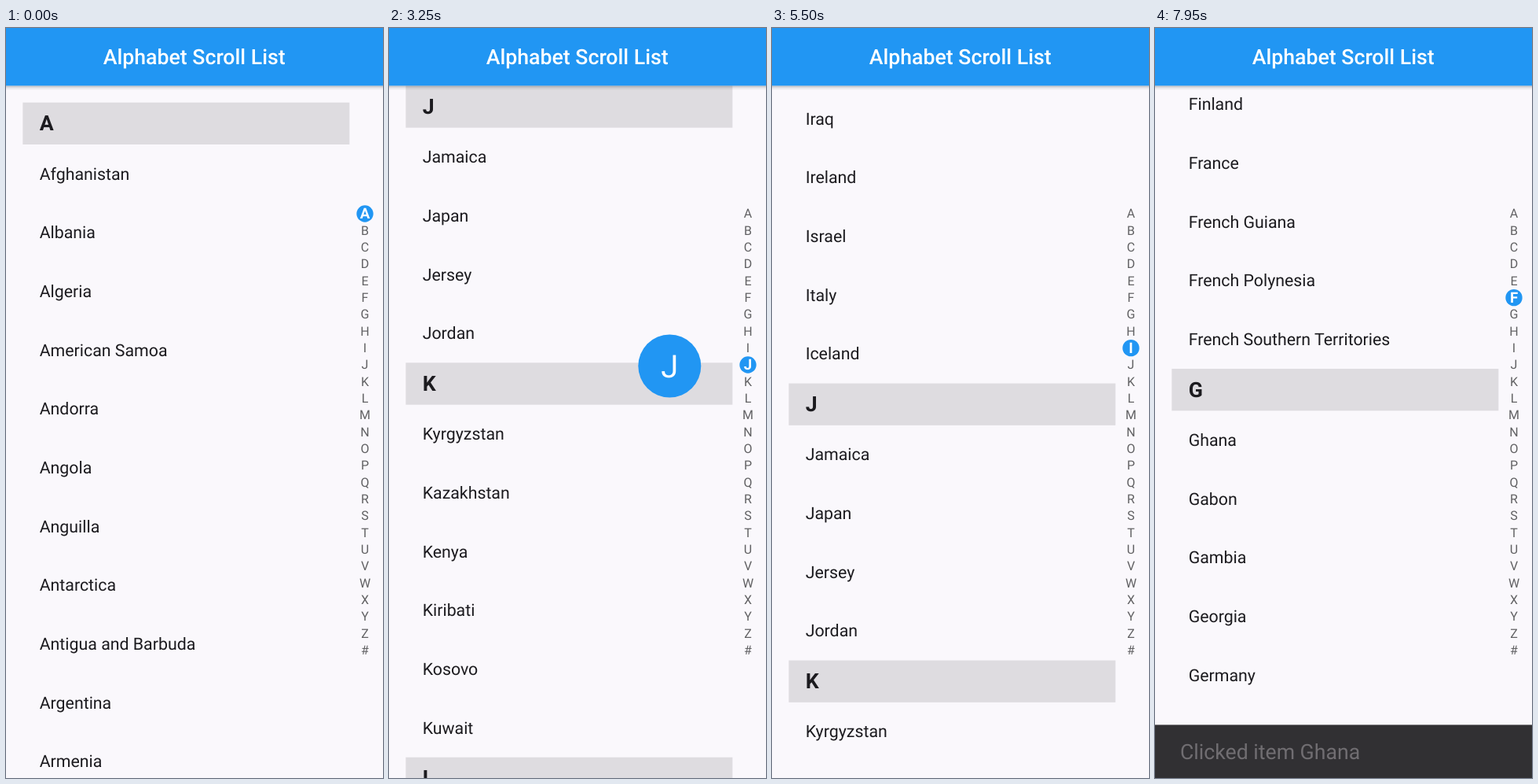
An HTML page for the animation above (8 s loop, 480x953 px).

```html
<!DOCTYPE html>
<html lang="en">
<head>
<meta charset="utf-8">
<title>Alphabet Scroll List</title>
<style>
  html, body { margin: 0; width: 100%; height: 100%; overflow: hidden; background: #faf8fc; }
  svg { display: block; width: 100%; height: 100%; }
  text { font-family: Roboto, "Open Sans", sans-serif; text-rendering: geometricPrecision; white-space: pre; }
</style>
</head>
<body>
<svg id="stage" viewBox="0 0 480 953"></svg>
<script>
const LOOP = 8000, STEP = 50;
const DP = 4 / 3;
const BAR = 55 * DP, HEAD = 40 * DP, ROW = 56 * DP, PAD = 16 * DP;
const LIST_W = 416, INDEX_X = 457, INDEX_Y = 236, PITCH = 16 * DP;
const BLUE = '#2196f3', INK = '#1c1b1f';
const LETTERS = [...'ABCDEFGHIJKLMNOPQRSTUVWXYZ#'];

const COUNTRIES = {
  A: 'Afghanistan,Albania,Algeria,American Samoa,Andorra,Angola,Anguilla,Antarctica,Antigua and Barbuda,Argentina,Armenia,Aruba,Australia,Austria,Azerbaijan',
  B: 'Bahamas,Bahrain,Bangladesh,Barbados,Belarus,Belgium,Belize,Benin,Bermuda,Bhutan,Bolivia,Bosnia and Herzegovina,Botswana,Bouvet Island,Brazil,British Indian Ocean Territory,Brunei Darussalam,Bulgaria,Burkina Faso,Burundi',
  C: 'Cambodia,Cameroon,Canada,Cape Verde,Cayman Islands,Central African Republic,Chad,Chile,China,Christmas Island,Cocos (Keeling) Islands,Colombia,Comoros,Congo,Cook Islands,Costa Rica,Croatia,Cuba,Cyprus,Czech Republic',
  D: 'Denmark,Djibouti,Dominica,Dominican Republic',
  E: 'Ecuador,Egypt,El Salvador,Equatorial Guinea,Eritrea,Estonia,Ethiopia',
  F: 'Falkland Islands (Malvinas),Faroe Islands,Fiji,Finland,France,French Guiana,French Polynesia,French Southern Territories',
  G: 'Ghana,Gabon,Gambia,Georgia,Germany,Gibraltar,Greece,Greenland,Grenada,Guadeloupe,Guam,Guatemala,Guernsey,Guinea,Guinea-Bissau,Guyana',
  H: 'Haiti,Heard Island and Mcdonald Islands,Holy See (Vatican City State),Honduras,Hong Kong,Hungary',
  I: 'Isle of Man,India,Indonesia,Iran,Iraq,Ireland,Israel,Italy,Iceland',
  J: 'Jamaica,Japan,Jersey,Jordan',
  K: 'Kyrgyzstan,Kazakhstan,Kenya,Kiribati,Kosovo,Kuwait',
  L: 'Lesotho,Laos,Latvia,Lebanon,Liberia,Libyan Arab Jamahiriya,Liechtenstein,Lithuania,Luxembourg',
  M: 'Morocco'
};

const stage = document.getElementById('stage');

function add(parent, tag, attrs) {
  const el = document.createElementNS('http://www.w3.org/2000/svg', tag);
  set(el, attrs);
  return parent.appendChild(el);
}

function set(el, attrs) {
  for (const k in attrs) el.setAttribute(k, attrs[k]);
}

// Text whose line box is centred on cy
function label(parent, str, x, cy, size, attrs) {
  const el = add(parent, 'text', { x, y: cy + 0.3415 * size, 'font-size': size, ...attrs });
  el.textContent = str;
  return el;
}

function show(el, on) {
  el.setAttribute('visibility', on ? 'visible' : 'hidden');
}

const defs = add(stage, 'defs', {});
const shade = add(defs, 'linearGradient', { id: 'shade', x1: 0, y1: 0, x2: 0, y2: 1 });
add(shade, 'stop', { offset: 0, 'stop-color': '#000', 'stop-opacity': 0.26 });
add(shade, 'stop', { offset: 0.45, 'stop-color': '#000', 'stop-opacity': 0.08 });
add(shade, 'stop', { offset: 1, 'stop-color': '#000', 'stop-opacity': 0 });

add(stage, 'rect', { width: 480, height: 953, fill: '#faf8fc' });

// Scrolling list
const list = add(stage, 'g', {});
const tops = {}, rowTop = {};
let end = 0;
for (const [letter, names] of Object.entries(COUNTRIES)) {
  tops[letter] = end;
  add(list, 'rect', { x: PAD, y: end, width: LIST_W, height: HEAD, fill: '#dedce0' });
  label(list, letter, 2 * PAD, end + HEAD / 2, 20 * DP, { 'font-weight': 700, fill: INK });
  end += HEAD;
  for (const name of names.split(',')) {
    rowTop[name] = end;
    label(list, name, 2 * PAD, end + ROW / 2, 16 * DP, { fill: INK });
    end += ROW;
  }
}

// Touch ripple clipped to its row
function ripple(name, x, dy) {
  const y = rowTop[name], id = 'row' + name;
  const clip = add(defs, 'clipPath', { id });
  add(clip, 'rect', { x: PAD, y, width: LIST_W, height: ROW });
  const g = add(list, 'g', { 'clip-path': `url(#${id})` });
  return add(g, 'circle', { cx: x, cy: y + dy, r: 0, fill: '#000' });
}
const dragRipple = ripple('Latvia', 355, 0.5);
const tapRipple = ripple('Ghana', 221, 37);

// Letter index
const marker = add(stage, 'circle', { cx: INDEX_X, r: 8 * DP, fill: BLUE });
const indexY = i => INDEX_Y + i * PITCH;
const middle = { 'text-anchor': 'middle' };
const plain = LETTERS.map((c, i) =>
  label(stage, c, INDEX_X, indexY(i), 12 * DP, { ...middle, fill: '#616163' }));
const bold = LETTERS.map((c, i) =>
  label(stage, c, INDEX_X, indexY(i), 14 * DP, { ...middle, fill: '#fff', 'font-weight': 700 }));

// Balloon beside the finger
const balloon = add(stage, 'g', {});
add(balloon, 'circle', { r: 30 * DP, fill: BLUE });
const balloonText = label(balloon, '', 0, 0.6, 30 * DP, { ...middle, fill: '#fff' });

// App bar
add(stage, 'rect', { y: BAR, width: 480, height: 6, fill: 'url(#shade)' });
add(stage, 'rect', { width: 480, height: BAR, fill: BLUE });
label(stage, 'Alphabet Scroll List', 239.7, BAR / 2, 20 * DP, { ...middle, fill: '#fff', 'font-weight': 500 });

// Snack bar
const SNACK_H = 68.6;
const snack = add(stage, 'g', {});
add(snack, 'rect', { width: 480, height: SNACK_H, fill: '#313033' });
const snackText = label(snack, 'Clicked item Ghana', 24 * DP, SNACK_H / 2, 20 * DP, { fill: '#f4eff4' });

const clamp = v => Math.max(0, Math.min(1, v));
const ramp = (t, a, b) => clamp((t - a) / (b - a));

function along(keys, t) {
  let [t0, v0] = keys[0];
  for (const [t1, v1] of keys) {
    if (t < t1) return v0 + (v1 - v0) * ramp(t, t0, t1);
    [t0, v0] = [t1, v1];
  }
  return v0;
}

// cubic-bezier(.4, 0, .2, 1)
function fastOutSlowIn(x) {
  const curve = (a, b, u) => 3 * a * u * (1 - u) ** 2 + 3 * b * u * u * (1 - u) + u ** 3;
  let lo = 0, hi = 1;
  for (let i = 0; i < 24; i++) {
    const u = (lo + hi) / 2;
    if (curve(0.4, 0.2, u) < x) lo = u; else hi = u;
  }
  return curve(0, 1, lo);
}

const PRESS = 50, RELEASE = 3800, FLING = 5400, REST = 6483;
const FINGER = [[50, 236], [850, 282], [1250, 322], [1450, 322], [2000, 377.3],
  [2550, 377.3], [3350, 437], [3600, 452], [3700, 456], [3750, 461]];
const DRAG = [[4900, 0], [5000, 50], [5100, 187.7], [5200, 240], [5300, 290], [FLING, 602]];
const REST_TOP = tops.G - 433 + BAR;

function scrollAt(t) {
  if (t < PRESS) return -PAD;
  if (t < RELEASE) return tops[LETTERS[fingerIndex(t)]];
  if (t < FLING) return tops.L - along(DRAG, t);
  return REST_TOP + 870 * Math.max(0, (REST - t) / 633) ** 2.358;
}

function fingerIndex(t) {
  return Math.round((along(FINGER, t) - INDEX_Y) / PITCH);
}

function currentIndex(scroll) {
  let found = 0;
  LETTERS.forEach((c, i) => { if (tops[c] <= scroll + 0.01) found = i; });
  return found;
}

function render(t) {
  const scroll = scrollAt(t);
  const active = currentIndex(scroll);
  list.setAttribute('transform', `translate(0 ${BAR - scroll})`);

  marker.setAttribute('cy', indexY(active));
  LETTERS.forEach((c, i) => {
    show(plain[i], i !== active);
    show(bold[i], i === active);
  });

  show(balloon, t >= PRESS && t < RELEASE);
  balloon.setAttribute('transform', `translate(357.3 ${along(FINGER, t)})`);
  balloonText.textContent = LETTERS[active];

  set(dragRipple, {
    r: 35 * ramp(t, 4880, 5100),
    opacity: t < 4950 ? 0 : 0.045 * (1 - ramp(t, 5100, 5250))
  });
  set(tapRipple, {
    r: 48 * ramp(t, 6950, 7200),
    opacity: t < 7000 ? 0 : 0.06 * (1 - ramp(t, 7100, 7250))
  });

  const rise = ramp(t, 7740, 7990);
  const fade = ramp(rise, 0.4, 1);
  show(snack, t >= 7800);
  snack.setAttribute('transform', `translate(0 ${953 - SNACK_H * fastOutSlowIn(rise)})`);
  snackText.setAttribute('opacity', 1 - Math.sqrt(1 - fade * fade));
}

const start = performance.now();
function tick() {
  const t = (performance.now() - start) % LOOP;
  render(Math.floor(t / STEP) * STEP);
  requestAnimationFrame(tick);
}
tick();
</script>
</body>
</html>
```
